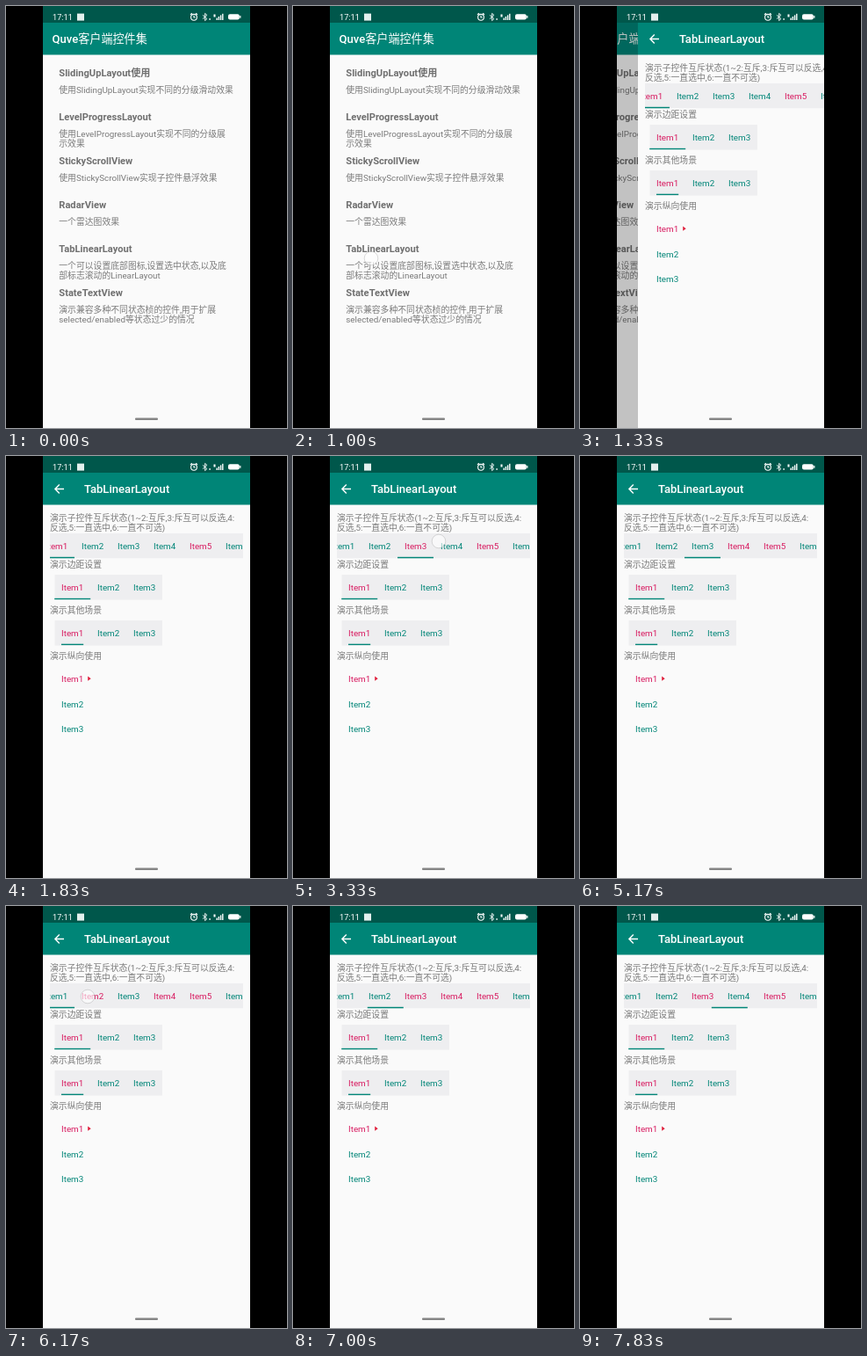
Recreate the animation shown at these times as an HTML page. Size 320 px wide and 480 px high, loop 8000 ms.

```html
<!DOCTYPE html>
<html lang="zh-CN">
<head>
<meta charset="utf-8">
<title>TabLinearLayout</title>
<style>
  html, body { margin: 0; width: 100%; height: 100%; overflow: hidden; background: #000; }
  svg { display: block; width: 100%; height: 100%; }
  text { font: 9.83px Roboto, "Noto Sans CJK SC", "Noto Sans CJK", sans-serif; white-space: pre; }
  .bar { font-size: 13.1px; font-weight: 500; fill: #fff; }
  .head { font-size: 11.14px; font-weight: 700; fill: #707070; }
  .body { fill: #7a7a7a; }
  .time { font-size: 9.2px; fill: #fff; }
</style>
</head>
<body>
<svg id="stage" viewBox="0 0 320 480"></svg>
<script>
const LOOP = 8000, RATE = 6 / 1000;
const PRIMARY = '#008577', DARK = '#00574b', ACCENT = '#d81b60', PAPER = '#fafafa', STRIP = '#eeeef0';
const WIDTH = 236, PITCH = 41, FIRST = 37;
const MOVE = 300, OPEN = 1120, OPENING = 400;

// release time, x, y, tab under the finger, tabs lit afterwards
const taps = [
  [2600, 140, 101, 2, [2, 4]],
  [3400, 166, 97, 3, [2, 3, 4]],
  [4450, 141, 100, 2, [3, 4]],
  [5430, 62, 102, 0, [0, 3, 4]],
  [6160, 93, 103, 1, [1, 3, 4]],
  [6920, 140, 101, 2, [2, 3, 4]],
  [7633, 176, 100, 3, [2, 4]]
];
const touches = [[1060, 89, 287], ...taps];

const rect = (x, y, w, h, fill, extra = '') =>
  `<rect x="${x}" y="${y}" width="${w}" height="${h}" fill="${fill}" ${extra}/>`;
const label = (x, y, str, cls = 'body') => `<text x="${x}" y="${y}" class="${cls}">${str}</text>`;
const item = (x, y, n, fill = PRIMARY, extra = '') =>
  `<text x="${x}" y="${y}" fill="${fill}" ${extra}>Item${n}</text>`;

const page = (title, x) =>
  rect(42, 0, WIDTH, 480, PAPER) + rect(42, 18, WIDTH, 37.5, PRIMARY) + label(x, 42.4, title, 'bar');

function listPage() {
  const rows = [
    ['SlidingUpLayout使用', '使用SlidingUpLayout实现不同的分级滑动效果'],
    ['LevelProgressLayout', '使用LevelProgressLayout实现不同的分级展', '示效果'],
    ['StickyScrollView', '使用StickyScrollView实现子控件悬浮效果'],
    ['RadarView', '一个雷达图效果'],
    ['TabLinearLayout', '一个可以设置底部图标,设置选中状态,以及底', '部标志滚动的LinearLayout'],
    ['StateTextView', '演示兼容多种不同状态桢的控件,用于扩展', 'selected/enabled等状态过少的情况']
  ];
  return page('Quve客户端控件集', 52.5) + rows.map(([head, ...lines], i) =>
    label(60.3, 80 + i * 50, head, 'head') +
    lines.map((s, k) => label(60.3, 98.7 + i * 50 + k * 11.4, s)).join('')).join('');
}

function smallStrip(top, baseline, lineX, lineY, lineW) {
  return rect(55.5, top, 122.5, 28.5, STRIP) +
    [1, 2, 3].map((n, i) => item(63 + i * PITCH, baseline, n, i ? PRIMARY : ACCENT)).join('') +
    rect(lineX, lineY, lineW, 1.4, PRIMARY);
}

function tabPage() {
  const tabs = [1, 2, 3, 4, 5, 6]
    .map((n, i) => item(FIRST + 8 + i * PITCH, 106, n, PRIMARY, 'data-tab')).join('');
  return page('TabLinearLayout', 89) +
    '<path d="M66 37.5H56M60.8 32.6L55.9 37.5L60.8 42.4" fill="none" stroke="#fff" stroke-width="1.4"/>' +
    label(50, 73.7, '演示子控件互斥状态(1~2:互斥,3:斥互可以反选,4:') +
    label(50, 85.2, '反选,5:一直选中,6:一直不可选)') +
    `<g clip-path="url(#strip)">${rect(50, 88, 220, 28.3, STRIP)}${tabs}` +
    rect(0, 114.8, PITCH, 1.5, PRIMARY, 'id="line"') + '</g>' +
    label(50, 126.8, '演示边距设置') + smallStrip(135, 153, 55.2, 161.8, PITCH) +
    label(50, 178.8, '演示其他场景') + smallStrip(187, 205, 63, 213.7, 25.2) +
    label(50, 230.8, '演示纵向使用') +
    [1, 2, 3].map((n, i) => item(63, 257 + i * 28.6, n, i ? PRIMARY : ACCENT)).join('') +
    '<path d="M93.2 250.6L96.7 253.2L93.2 255.8Z" fill="#e0203c"/>';
}

function statusBar() {
  const bars = [0, 1, 2, 3].map(i => rect(239.5 + i * 2.2, 13.6 - i * 1.6, 1.4, 2.4 + i * 1.6, '#fff')).join('');
  return rect(42, 0, WIDTH, 19, DARK) + label(53, 16, '17:11', 'time') +
    rect(81, 8.6, 8, 8, '#e4f0ee') +
    '<g fill="none" stroke="#fff" stroke-width="1.1">' +
    '<circle cx="214" cy="12.8" r="3.4"/><path d="M214 10.8V13H215.6M210 9.8L212 8.3M218 9.8L216 8.3"/>' +
    '<path d="M224 10.4L229 14.6L226.6 16.6V8.4L229 10.4L224 14.6" stroke-width=".9"/></g>' +
    rect(231.5, 14, 1.2, 2, '#fff') + rect(236.5, 9.5, 2, 3, '#fff') + bars +
    rect(253, 9.3, 12.8, 6.2, '#fff', 'rx="2"') + rect(266.2, 11, 1.2, 2.8, '#fff');
}

const stage = document.getElementById('stage');
stage.innerHTML =
  '<defs><clipPath id="phone"><rect x="42" width="236" height="480"/></clipPath>' +
  '<clipPath id="strip"><rect x="50" y="88" width="220" height="29"/></clipPath></defs>' +
  rect(0, 0, 320, 480, '#000') +
  `<g clip-path="url(#phone)"><g id="list">${listPage()}</g>${rect(42, 0, WIDTH, 480, '#000', 'id="shade"')}` +
  `<g id="tabs">${tabPage()}</g>${statusBar()}` +
  rect(147, 468.6, 26, 2.4, '#858585', 'rx="1"') +
  '<circle id="dot" r="7.8" fill="#fff" fill-opacity=".6" stroke="#808080" stroke-opacity=".35" stroke-width=".8"/></g>';

const [list, shade, tabsView, line, dot] =
  ['list', 'shade', 'tabs', 'line', 'dot'].map(id => document.getElementById(id));
const tabTexts = stage.querySelectorAll('[data-tab]');
const clamp = v => Math.min(1, Math.max(0, v));
const ease = p => (1 - Math.cos(Math.PI * clamp(p))) / 2;
const shift = (el, x) => el.setAttribute('transform', `translate(${x} 0)`);

function draw(t) {
  // the new page slides over the old one, which drifts left and darkens
  const slide = 1 - (1 - clamp((t - OPEN) / OPENING)) ** 3;
  shift(tabsView, WIDTH * (1 - slide));
  shift(list, -WIDTH * slide / 4);
  shade.setAttribute('opacity', slide * 0.25);

  let at = 0, lit = [0, 4];
  for (const [time, , , tab, on] of taps) {
    if (t < time) break;
    at += (tab - at) * ease((t - time) / MOVE);
    lit = on;
  }
  line.setAttribute('x', FIRST + at * PITCH);
  tabTexts.forEach((el, i) => el.setAttribute('fill', lit.includes(i) ? ACCENT : PRIMARY));

  const touch = touches.find(([time]) => t > time - 200 && t < time + 30);
  dot.style.display = touch ? '' : 'none';
  if (touch) {
    dot.setAttribute('cx', touch[1]);
    dot.setAttribute('cy', touch[2]);
  }
}

const start = performance.now();
function tick() {
  const t = (performance.now() - start) % LOOP;
  draw(Math.floor((t + 5) * RATE) / RATE % LOOP);
  requestAnimationFrame(tick);
}
tick();
</script>
</body>
</html>
```
